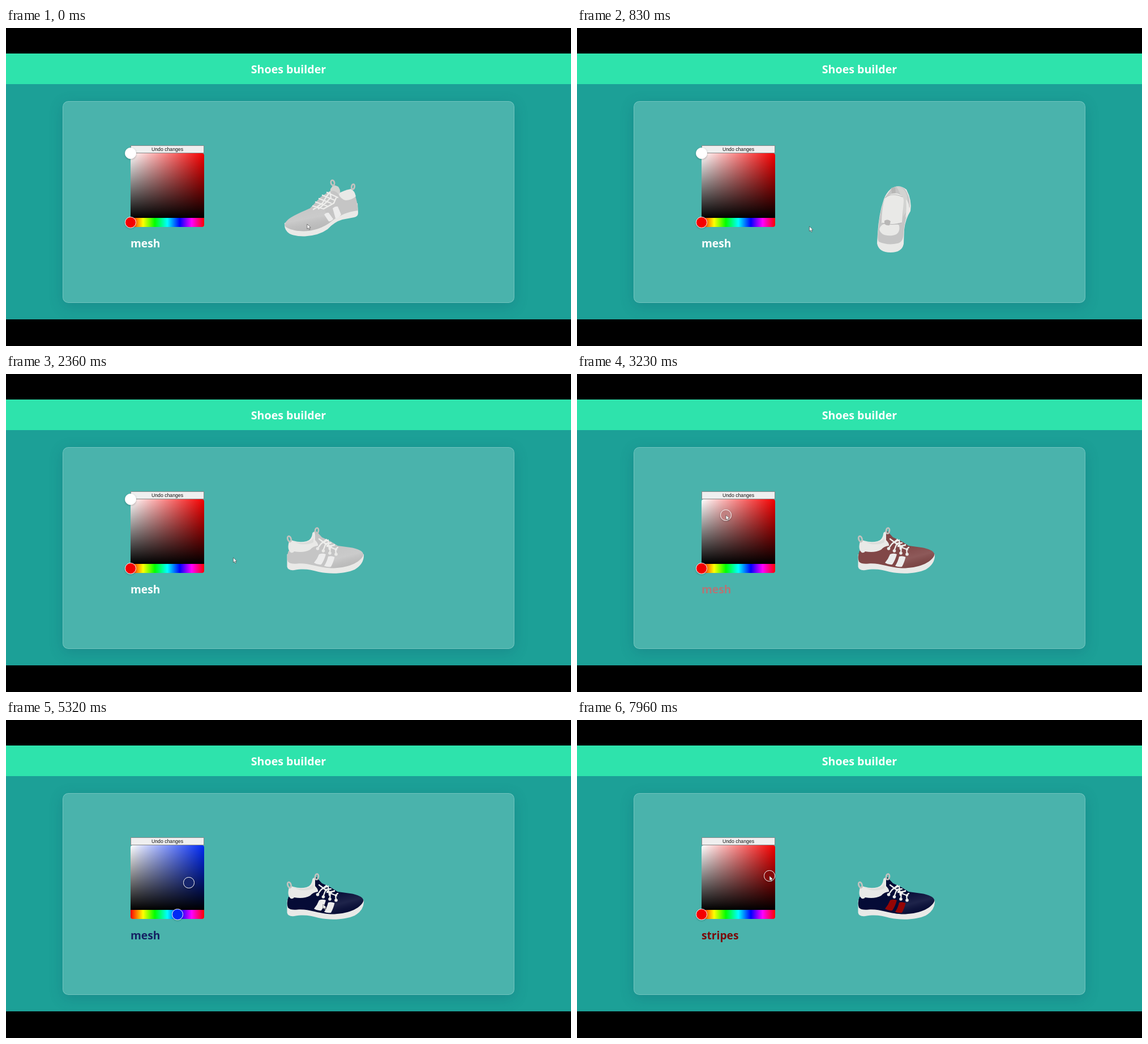
Animation of 998x561 px, one loop 7.99 s. Source, as an HTML page:

```html
<!DOCTYPE html>
<html lang="en">
<head>
<meta charset="utf-8">
<title>Shoes builder</title>
<style>
  html, body { margin: 0; width: 100%; height: 100%; overflow: hidden; background: #000; }
  #stage { position: absolute; left: 0; top: 0; width: 998px; height: 561px; overflow: hidden; background: #000; }
  #stage div, #stage svg { position: absolute; box-sizing: border-box; }
  #page { left: 0; top: 45px; width: 998px; height: 469px; background: #1ca097; overflow: hidden; }
  #header { left: 0; top: 0; width: 998px; height: 54px; background: #2ee3ac; }
  #panel { left: 100px; top: 83.5px; width: 798px; height: 356px; border-radius: 10px;
    background: rgba(255,255,255,.205); border: 1px solid rgba(255,255,255,.22);
    box-shadow: 0 6px 25px rgba(20,70,100,.22); }
  #undo { left: 220px; top: 207px; width: 130px; height: 14px; background: #efefef; border: .7px solid #888;
    font: 8.7px/12.4px "Liberation Sans", sans-serif; text-align: center; color: #111; }
  #sat { left: 220px; top: 221px; width: 130px; height: 114px; border-radius: 4px 4px 0 0; }
  #hue { left: 220px; top: 335px; width: 130px; height: 16px; border-radius: 0 0 4px 4px;
    background: linear-gradient(90deg, #f00, #ff0 17%, #0f0 33%, #0ff 50%, #00f 67%, #f0f 83%, #f00); }
  .thumb { width: 19.5px; height: 19.5px; margin: -9.75px; border: 1.7px solid #fff; border-radius: 50%;
    box-shadow: 0 1px 3px rgba(0,0,0,.25); }
  text { font: 700 19.6px "Open Sans", "Noto Sans", sans-serif; }
  #label { font-size: 19.2px; }
  .mesh { fill: var(--mesh); }
  .stripe { fill: var(--stripe); }
  .white { fill: #e9e9e7; }
  .shade { fill: #d2d3d1; }
  .lace { fill: none; stroke: #eeeeec; stroke-width: 2.3; stroke-linecap: round; stroke-linejoin: round; }
  .loop { fill: none; stroke: #c4c2bf; stroke-width: 2.8; }
</style>
</head>
<body>
<div id="stage">
  <div id="page"><div id="header"></div><div id="panel"></div></div>
  <div id="undo">Undo changes</div>
  <div id="sat"></div>
  <div id="hue"></div>
  <div class="thumb" id="satThumb"></div>
  <div class="thumb" id="hueThumb"></div>
  <svg width="998" height="561" viewBox="0 0 998 561">
    <defs>
      <linearGradient id="gloss" x1="0" y1="0" x2=".4" y2="1">
        <stop offset="0" stop-color="#fff" stop-opacity="0"/>
        <stop offset=".55" stop-color="#fff" stop-opacity=".1"/>
        <stop offset="1" stop-color="#000" stop-opacity=".06"/>
      </linearGradient>
    </defs>
    <text x="499" y="80.3" text-anchor="middle" fill="#fff">Shoes builder</text>
    <text id="label" x="220" y="387"></text>

    <g id="front">
      <path class="white" d="M492 344 Q491 357 501 363 Q511 368 528 367.5 Q553 366 568 355 Q580 342 594 338 L615 334 Q622 333 622 326 L621 309 Z"/>
      <path class="mesh" d="M492 348 C493 336 515 328 537 318 L556 298 L573 287 L577 277 Q586 277 590 286 L591 296 Q604 300 616 294 Q621 306 621.500 322 C604 324 590 330 575 341 C556 357 530 361 510 357 Q495 354 492 348 Z"/>
      <path fill="url(#gloss)" d="M492 348 C493 336 515 328 537 318 L562 320 L575 341 C556 357 530 361 510 357 Q495 354 492 348 Z"/>
      <path class="white" d="M587 292 Q598 286 609 284 Q616 287 618 297 Q610 304 600 304 Q591 302 587 292 Z"/>
      <path class="shade" d="M573 284 Q579 275 587 280 Q592 287 588 294 Q580 284 573 289 Z"/>
      <path class="stripe" d="M577 318 Q582 314 586 315 L592 329 Q588 335 582 336 Z M562 329 Q566 325 570 326 L578 337 Q574 342 570 341 Z"/>
      <path class="lace" d="M542 314 L561 319 M547 307 L567 314 M553 301 L574 309 M559 295 L581 304 M567 290 L586 299 M543 320 L559 309 L565 299 L570 292 M552 319 L566 307 L574 299 L572 290 M561 319 L579 309 L583 300"/>
      <ellipse class="loop" cx="577" cy="273" rx="3" ry="4.500" transform="rotate(-12 577 273)"/>
      <ellipse class="loop" cx="613" cy="280" rx="2.600" ry="4.500" transform="rotate(12 613 280)"/>
    </g>

    <g id="rear">
      <path class="white" d="M554 284 Q568 274 582 285 Q592 304 589 323 Q580 337 578 356 L577 381 Q574 396 554 396 Q533 396 530 380 L531 363 Q533 328 542 302 Q546 291 554 284 Z"/>
      <path class="mesh" d="M555 284 Q567 275 579 284 Q588 296 588 315 Q579 337 577 360 Q577 378 566 380 Q549 384 533 377 Q530 372 532 357 Q534 325 544 299 Z"/>
      <path class="shade" d="M564 280 Q578 279 583 296 Q586 311 581 325 L576 333 Q578 300 564 280 Z"/>
      <path class="white" d="M581 302 Q588 309 587 324 L580 335 Q583 320 581 302 Z"/>
      <path class="white" d="M544 300 Q554 290 566 292 Q578 296 577 306 L574 343 Q558 348 538 344 Q538 317 544 300 Z"/>
      <path class="white" d="M534 355 Q537 344 549 345 Q562 343 569 348 Q572 364 557 366 Q537 368 534 355 Z"/>
      <path fill="none" stroke="#b7b7b7" d="M539 344 Q558 349 573 344 M544 300 Q556 289 575 298"/>
      <path fill="#b8b7b6" d="M543 340 Q549 336 554 341 L552 348 Q546 349 543 345 Z M555 282 L562 281 L563 291 L556 292 Z"/>
    </g>

    <g id="side">
      <path class="white" d="M496.500 318 L496.500 340 Q498 347 509 346 C526 343 538 345 552 349 C575 354 600 352 616 345 Q633 335 632 318 Z"/>
      <path class="mesh" d="M499 312 Q495 323 498 331 Q503 336 515 334.500 C535 333 548 341 573 342.500 C600 343 626 334 631.500 319 C631 312 621 308 608 306 L586 303 L573 295 L558 288 L548 277 L541 300 L520 313 Z"/>
      <path fill="url(#gloss)" d="M580 318 L590 304 L608 306 C621 308 631 312 631.500 319 C626 334 600 343 573 342.500 Z"/>
      <path class="white" d="M499 300 Q500 291 507 294 Q519 298 531 295 Q540 293 541.500 280 L546 277 L546 293 Q552 299 551 303 Q542 304 537 310 Q526 316 509 313 Q507 316 503 315 Q497 310 499 300 Z"/>
      <path class="shade" opacity=".55" d="M507 295 Q520 300 533 296 Q540 294 543 289 L543 297 Q533 302 519 300 Z"/>
      <path class="stripe" d="M553 318 Q559 315.500 565 318 Q562 329 557 336 Q550 337 544 333 Q550 326 553 318 Z M569 322 Q575 320 580.500 323 Q578 333 574 340 Q567 341 562 338.500 Q567 331 569 322 Z"/>
      <path class="lace" d="M551 307 L556 300 L566 292 M560 312 L565 299 L574 298 M572 316 L573 305 L580 301 M583 318 L582 309 L586 306 M553 291 L565 300 L574 306 L584 310 M558 298 L569 293 L571 309 M567 304 L580 302"/>
      <g class="white"><circle cx="550.500" cy="308" r="2.800"/><circle cx="560.500" cy="312" r="2.800"/><circle cx="572" cy="316" r="2.800"/><circle cx="583" cy="318" r="2.800"/></g>
      <ellipse class="loop" cx="500.500" cy="291" rx="2.900" ry="5" transform="rotate(-18 500.500 291)"/>
      <ellipse class="loop" cx="549" cy="276.500" rx="2.900" ry="5" transform="rotate(8 549 276.500)"/>
    </g>

    <path id="cursor" d="M0 0 L0 8.500 L2 6.700 L3.500 10 L5 9.300 L3.600 6.200 L6.300 6 Z" fill="#fff" stroke="#333" stroke-width=".6"/>
  </svg>
</div>
<script>
const $ = id => document.getElementById(id);
const LOOP = 7990;
const SAT = { x: 220, y: 221, w: 130, h: 114 };
const SELECT_STRIPES = 5480;

// Rows: time, x, y
const cursorPath = [
  [0, 532, 346], [830, 410.5, 350], [1000, 400, 349], [1300, 490, 342], [1450, 490, 342],
  [2250, 403, 324], [2400, 401, 324], [2900, 246, 238], [3050, 246, 238], [3750, 323, 287],
  [3900, 323, 287], [4300, 223, 343], [4400, 223, 343], [4900, 303, 343], [5000, 303, 343],
  [5300, 560, 325], [5550, 560, 325], [6050, 280, 245], [6150, 280, 245], [6600, 311, 263],
  [6750, 311.5, 263], [7250, 326, 256], [7800, 340, 275], [LOOP, 340, 275]
];
// Rows: time, heel-to-toe vector x, y, centre x, y
const turn = [
  [0, -120, 35, 557, 318], [300, -118, -15, 558, 322], [550, -78, -72, 559, 330],
  [830, 20, -100, 560, 338], [1000, 30, -98, 560, 338], [1450, 30, -98, 560, 338],
  [1750, 90, -62, 562, 326], [2000, 124, -28, 563, 316], [2250, 135, -10, 564, 312]
];

function sample(rows, t) {
  const i = rows.findIndex(r => r[0] > t);
  if (i < 0) return rows.at(-1).slice(1);
  const a = rows[i - 1], b = rows[i], u = (t - a[0]) / (b[0] - a[0]);
  const k = u * u * (3 - 2 * u) * .4 + u * .6;
  return a.slice(1).map((v, n) => v + (b[n + 1] - v) * k);
}
const clamp = (v, lo, hi) => Math.min(hi, Math.max(lo, v));
const ramp = (t, from, to) => clamp((t - from) / (to - from), 0, 1);
const css = c => `rgb(${c.map(v => Math.round(clamp(v, 0, 255))).join()})`;
const tone = (c, gain, power) => css(c.map(v => Math.min(236, gain * (v / 255) ** power)));

function hsv(h, s, v) {
  return [5, 3, 1].map(n => {
    const k = (n + h / 60) % 6;
    return 255 * v * (1 - s * clamp(Math.min(k, 4 - k), 0, 1));
  });
}

// Picker state while one part of the shoe is being coloured
function pick(t, start, end, hueStart, hueEnd) {
  const [x, y] = t < start ? [SAT.x, SAT.y] : sample(cursorPath, Math.min(t, end));
  const hueX = t < hueStart ? SAT.x : sample(cursorPath, Math.min(t, hueEnd))[0];
  const hue = (hueX - SAT.x) / SAT.w * 360;
  return { x, y, hueX, hue, rgb: hsv(hue, (x - SAT.x) / SAT.w, 1 - (y - SAT.y) / SAT.h) };
}
const pickMesh = t => pick(t, 2950, 3850, 4350, 4950);
const pickStripes = t => pick(t, 6100, LOOP, Infinity);

// Keep verticals upright and lay the shoe's long axis along (vx, vy)
function pose(id, [vx, vy, cx, cy], [ux, uy, ox, oy], opacity, endOn) {
  const m = endOn
    ? [1, 0, (vx - ux) / uy, Math.max(.3, vy / uy)]
    : [vx / ux, (vy - uy) / ux, 0, 1];
  const e = cx - m[0] * ox - m[2] * oy, f = cy - m[1] * ox - m[3] * oy;
  const el = $(id);
  el.setAttribute('transform', `matrix(${[...m, e, f].join(' ')})`);
  el.style.opacity = opacity;
  el.style.display = opacity ? '' : 'none';
}

function place(id, x, y, colour) {
  Object.assign($(id).style, { left: x + 'px', top: y + 'px', background: colour });
}

function draw(t) {
  const mesh = pickMesh(Math.min(t, SELECT_STRIPES));
  const stripes = pickStripes(t);
  const onStripes = t >= SELECT_STRIPES;
  const now = onStripes ? stripes : mesh;
  const pure = css(hsv(now.hue, 1, 1).map(v => v * .96));

  const view = sample(turn, t);
  const toRear = ramp(t, 460, 540), toSide = ramp(t, 1640, 1720);
  pose('front', view, turn[0].slice(1), toRear < 1 ? 1 : 0);
  pose('rear', view, turn[3].slice(1), toSide < 1 ? toRear : 0, true);
  pose('side', view, turn.at(-1).slice(1), toSide);

  const root = $('stage').style;
  root.setProperty('--mesh', tone(mesh.rgb, 197, 1.5));
  root.setProperty('--stripe', tone(stripes.rgb, 344, 1.3));
  $('sat').style.background =
    `linear-gradient(0deg,#000,transparent),linear-gradient(90deg,#fff,rgba(255,255,255,0)),${pure}`;
  place('satThumb', now.x, now.y, css(now.rgb));
  place('hueThumb', now.hueX, 343, pure);

  $('label').textContent = onStripes ? 'stripes' : 'mesh';
  const touched = now.x > SAT.x;
  $('label').setAttribute('fill', css(now.rgb.map(v => touched ? v * .92 : v)));
  $('cursor').setAttribute('transform', `translate(${sample(cursorPath, t).join(' ')})`);
}

const begin = performance.now();
function frame() {
  draw((performance.now() - begin) % LOOP);
  requestAnimationFrame(frame);
}
frame();
</script>
</body>
</html>
```
